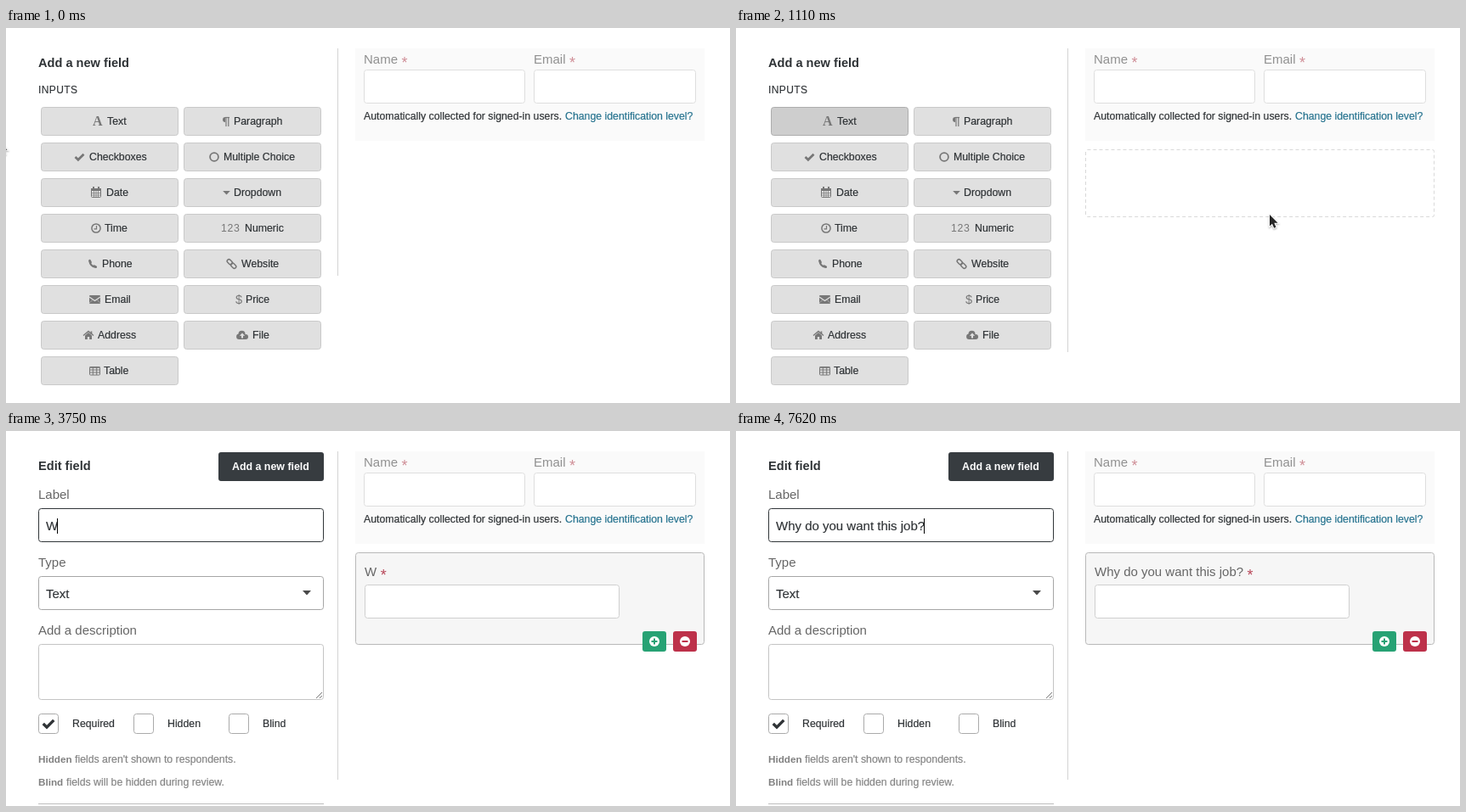
Recreate the animation shown at these times as an HTML page with a canvas. Size 852 by 442 pixels, loop 7680 ms.

```html
<!DOCTYPE html>
<html lang="en">
<head>
<meta charset="utf-8">
<title>Form builder</title>
<style>
  html, body { margin: 0; width: 100%; height: 100%; overflow: hidden; background: #fff; }
  canvas { display: block; width: 852px; height: 442px; }
</style>
</head>
<body>
<canvas id="stage" width="852" height="442"></canvas>
<script>
const ctx = document.getElementById('stage').getContext('2d');
const LOOP = 7680;
const SANS = '"Liberation Sans", Arial, sans-serif';
const SMALL = `12.3px ${SANS}`;
const BODY = `15px ${SANS}`;
const HEAD = `bold 14.6px ${SANS}`;
const INK = '#2f3336', ICON = '#777', LABEL = '#666', REQUIRED = '#b8485a';

const DRAG_START = 390, DROP = 1260, TYPE_START = 3750;
const SELECT_START = 2940, SELECT_END = 3210;
const QUESTION = 'Why do you want this job?';
const KEY_TIMES = [
  3750, 3960, 4050, 4140, 4230, 4320, 4410, 4500, 4590, 4680, 4800,
  4950, 5010, 5070, 5250, 5700, 5850, 5970, 6180, 6330, 6660, 6780,
  6990, 7080, 7500
];

// Pointer path: time, x, y
const PATH = [
  [0, -8, 134], [300, 146, 112], [390, 140, 112], [510, 110, 143],
  [960, 628, 220], [2460, 628, 220], [2880, 101, 111],
  [SELECT_START, 101, 111], [SELECT_END, 43, 111]
];

function text(str, x, y, font, color, weight = 0) {
  ctx.font = font;
  ctx.fillStyle = color;
  ctx.fillText(str, x, y);
  if (weight) {
    ctx.strokeStyle = color;
    ctx.lineWidth = weight;
    ctx.strokeText(str, x, y);
  }
  return ctx.measureText(str).width;
}

const small = (str, x, y, color = INK) => text(str, x, y, SMALL, color, 0.2);

function box(x, y, w, h, fill, border, radius = 3) {
  ctx.beginPath();
  if (border) ctx.roundRect(x + 0.5, y + 0.5, w - 1, h - 1, radius);
  else ctx.roundRect(x, y, w, h, radius);
  ctx.fillStyle = fill;
  ctx.fill();
  if (border) {
    ctx.strokeStyle = border;
    ctx.lineWidth = 1;
    ctx.stroke();
  }
}

function trace(points) {
  ctx.beginPath();
  points.forEach(([x, y], i) => i ? ctx.lineTo(x, y) : ctx.moveTo(x, y));
}

function poly(points, color) {
  trace(points);
  ctx.closePath();
  ctx.fillStyle = color;
  ctx.fill();
}

function line(points, color, width = 1) {
  trace(points);
  ctx.strokeStyle = color;
  ctx.lineWidth = width;
  ctx.stroke();
}

function disc(x, y, r, color) {
  ctx.beginPath();
  ctx.arc(x, y, r, 0, Math.PI * 2);
  ctx.fillStyle = color;
  ctx.fill();
}

function ring(x, y, r, color, width) {
  ctx.beginPath();
  ctx.arc(x, y, r, 0, Math.PI * 2);
  ctx.strokeStyle = color;
  ctx.lineWidth = width;
  ctx.stroke();
}

function asterisk(x, y, color) {
  text('*', x, y + 5, `18px ${SANS}`, color);
}

function tick(x, y, s, color) {
  line([[x - 5 * s, y], [x - 1.6 * s, y + 3.3 * s], [x + 5 * s, y - 3.3 * s]], color, 2.7 * s);
}

// Icons are drawn around their own centre.
const icons = {
  font() { text('A', -6, 5, 'bold 16px "Liberation Serif", serif', ICON); },
  paragraph() {
    ctx.beginPath();
    ctx.arc(-1, -2, 3, Math.PI / 2, Math.PI * 1.5);
    ctx.fillStyle = ICON;
    ctx.fill();
    line([[-1, -4.5], [4, -4.5]], ICON, 1.2);
    line([[0, -5], [0, 6]], ICON, 1.2);
    line([[2.8, -5], [2.8, 6]], ICON, 1.2);
  },
  check() { tick(0, 0, 1, ICON); },
  circle() { ring(0, 0, 4.9, ICON, 1.8); },
  calendar() {
    box(-6, -5, 12, 11, '#e0e0e0', ICON, 1);
    ctx.fillRect(0, 0, 0, 0);
    ctx.fillStyle = ICON;
    ctx.fillRect(-6, -5, 12, 3);
    ctx.fillRect(-4, -7, 2, 4);
    ctx.fillRect(2, -7, 2, 4);
    for (const x of [-2.5, 0, 2.5]) line([[x, -2], [x, 6]], ICON, 0.7);
    for (const y of [0.5, 3]) line([[-6, y], [6, y]], ICON, 0.7);
  },
  caret() { poly([[-4.3, -2], [4.3, -2], [0, 2.5]], ICON); },
  clock() {
    ring(0, 0, 5.1, ICON, 1.5);
    line([[0.5, -3], [0.5, 0.8], [-2.5, 0.8]], ICON, 1.2);
  },
  digits() {
    ctx.letterSpacing = '0.7px';
    text('123', -11, 4, SMALL, ICON);
    ctx.letterSpacing = '0px';
  },
  phone() {
    ctx.lineCap = 'round';
    ctx.beginPath();
    ctx.moveTo(-3.6, -3.2);
    ctx.quadraticCurveTo(-2.8, 2.6, 3.2, 3.7);
    ctx.strokeStyle = ICON;
    ctx.lineWidth = 2.2;
    ctx.stroke();
    line([[-3.5, -3.8], [-2.4, -1.8]], ICON, 2.6);
    line([[1.8, 2.6], [3.8, 3.6]], ICON, 2.6);
    ctx.lineCap = 'butt';
  },
  link() {
    ctx.save();
    ctx.rotate(Math.PI / 4);
    for (const x of [-6.6, -0.4]) {
      ctx.beginPath();
      ctx.roundRect(x, -2.1, 7, 4.2, 2.1);
      ctx.strokeStyle = ICON;
      ctx.lineWidth = 1.5;
      ctx.stroke();
    }
    ctx.restore();
  },
  envelope() {
    box(-6.5, -5, 13, 10, ICON, null, 1);
    line([[-6.5, -3], [0, 1.5], [6.5, -3]], '#e0e0e0', 1.1);
    line([[-6.5, 4], [-2.5, 0.5]], '#c4c4c4', 0.6);
    line([[6.5, 4], [2.5, 0.5]], '#c4c4c4', 0.6);
  },
  dollar() { text('$', -4, 5, `14.5px ${SANS}`, ICON); },
  home() {
    line([[-6, 0.5], [0, -4.5], [6, 0.5]], ICON, 1.4);
    poly([[-4, 0.4], [0, -3], [4, 0.4], [4, 5], [1.2, 5], [1.2, 2], [-1.2, 2], [-1.2, 5], [-4, 5]], ICON);
    ctx.fillRect(2.6, -4.5, 1.7, 3.5);
  },
  cloud() {
    disc(-3.6, 1.7, 3.3, ICON);
    disc(-0.5, -1.2, 4, ICON);
    disc(4, 2, 3, ICON);
    ctx.fillRect(-3.6, 0, 7.6, 5);
    poly([[-3.2, 0.8], [0, -2.6], [3.2, 0.8], [1, 0.8], [1, 3.6], [-1, 3.6], [-1, 0.8]], '#e0e0e0');
  },
  table() {
    box(-6.5, -5, 13, 10.5, '#e0e0e0', ICON, 1);
    line([[-6, -4], [6, -4]], ICON, 1.6);
    for (const x of [-2.2, 2.2]) line([[x, -4], [x, 5]], ICON);
    for (const y of [-1, 2]) line([[-6, y], [6, y]], ICON);
  }
};

// Label, text x, icon, icon centre x; filled row by row in two columns.
const INPUTS = [
  ['Text', 119, 'font', 108], ['Paragraph', 268, 'paragraph', 259],
  ['Checkboxes', 98, 'check', 86.5], ['Multiple Choice', 256, 'circle', 245],
  ['Date', 118, 'calendar', 106], ['Dropdown', 268, 'caret', 259.5],
  ['Time', 116, 'clock', 106], ['Numeric', 281, 'digits', 264],
  ['Phone', 113, 'phone', 102], ['Website', 277, 'link', 265.5],
  ['Email', 116, 'envelope', 104.5], ['Price', 282, 'dollar', 274],
  ['Address', 108, 'home', 97], ['File', 290, 'cloud', 278],
  ['Table', 115, 'table', 104.5]
];

function drawPalette(pressed) {
  text('Add a new field', 38, 46, HEAD, INK);
  ctx.letterSpacing = '0.4px';
  text('INPUTS', 38, 77, `12px ${SANS}`, INK, 0.15);
  ctx.letterSpacing = '0px';
  INPUTS.forEach(([label, x, icon, iconX], i) => {
    const y = 93 + 42 * (i >> 1);
    const active = pressed && i === 0;
    box(i % 2 ? 209 : 41, y, 162, 34, active ? '#cecece' : '#e0e0e0', active ? '#adadad' : '#c9c9c9');
    ctx.save();
    ctx.translate(iconX, y + 17);
    icons[icon]();
    ctx.restore();
    small(label, x, y + 21);
  });
}

function drawEditor(value, state) {
  text('Edit field', 38, 46, HEAD, INK);
  box(250, 25, 124, 34, '#373c40');
  text('Add a new field', 266, 46, `bold 12.4px ${SANS}`, '#fff');

  text('Label', 38, 80, BODY, LABEL);
  box(38, 91, 336, 40, '#fff', '#303538');
  if (state.selected > 0) {
    ctx.fillStyle = '#b4d5fe';
    ctx.fillRect(99 - state.selected, 102, state.selected, 19);
  }
  const width = text(value, 47, 117, BODY, INK, 0.15);
  if (state.caret) {
    ctx.fillStyle = '#000';
    ctx.fillRect(Math.round(46.3 + width), 103, 1, 18);
  }

  text('Type', 38, 160, BODY, LABEL);
  box(38, 171, 336, 40, '#fff', '#a6a6a6');
  text('Text', 47, 197, BODY, INK, 0.15);
  poly([[349, 188], [359, 188], [354, 193.5]], '#4a4a4a');

  text('Add a description', 38, 240, BODY, LABEL);
  box(38, 251, 336, 66, '#fff', '#c4c4c4');
  line([[365, 315], [372, 308]], '#777');
  line([[369, 315], [372, 312]], '#777');

  ['Required', 'Hidden', 'Blind'].forEach((label, i) => {
    const x = 38 + 112 * i;
    box(x, 333, 24, 24, '#fff', '#aaa');
    small(label, x + 40, 349);
  });
  tick(50, 345, 1.25, INK);

  const hints = [
    ['Hidden', 81, "fields aren't shown to respondents."],
    ['Blind', 71, 'fields will be hidden during review.']
  ];
  hints.forEach(([name, x, rest], i) => {
    const y = 391 + 27 * i;
    text(name, 38, y, `bold 11.7px ${SANS}`, '#808080');
    small(rest, x, y, '#858585');
  });
  ctx.fillStyle = '#bdbdbd';
  ctx.fillRect(38, 439, 336, 1);
}

function drawIdentity() {
  ctx.fillStyle = '#fafafa';
  ctx.fillRect(411, 24, 411, 109);
  [['Name', 421, 190], ['Email', 621, 191]].forEach(([label, x, w]) => {
    const end = x + text(label, x, 42, BODY, '#909090');
    asterisk(end + 4.5, 42, '#cf8f97');
    box(x, 49, w, 40, '#fff', '#dedede');
  });
  small('Automatically collected for signed-in users.', 421, 108);
  small('Change identification level?', 658, 108, '#26738f');
}

function badge(x, color, plus) {
  box(x, 236, 28, 24, color);
  disc(x + 14, 248, 6, '#fff');
  line([[x + 10.5, 248], [x + 17.5, 248]], color, 2);
  if (plus) line([[x + 14, 244.5], [x + 14, 251.5]], color, 2);
}

function drawField(label) {
  box(411, 143, 411, 109, '#f6f6f6', '#b9b9b9');
  const end = 422 + text(label, 422, 171, BODY, LABEL);
  asterisk(end + 4.5, 171, REQUIRED);
  box(422, 181, 300, 40, '#fff', '#cfcfcf');
  badge(749, '#27a274', true);
  badge(785, '#bd314a', false);
}

function drawPlaceholder() {
  ctx.setLineDash([4, 3]);
  box(411, 143, 411, 80, '#fff', '#d9d9d9', 2);
  ctx.setLineDash([]);
}

function pointerAt(t) {
  const next = PATH.findIndex(p => p[0] > t);
  if (next < 0) return PATH[PATH.length - 1].slice(1);
  const [t0, x0, y0] = PATH[next - 1], [t1, x1, y1] = PATH[next];
  const u = (t - t0) / (t1 - t0);
  const e = u * u * (3 - 2 * u);
  return [x0 + (x1 - x0) * e, y0 + (y1 - y0) * e];
}

function drawPointer(x, y, beam) {
  ctx.save();
  ctx.translate(Math.round(x), Math.round(y));
  if (beam) {
    line([[-2.5, -7.5], [0.5, -6.5], [0.5, 7.5], [-2.5, 8.5]], '#222');
    line([[3.5, -7.5], [0.5, -6.5], [0.5, 7.5], [3.5, 8.5]], '#222');
  } else {
    const arrow = [[0, 0], [0, 13.5], [3, 10.7], [5.2, 15.8], [7.5, 14.8], [5.3, 9.8], [9.6, 9.8]];
    ctx.shadowColor = 'rgba(0,0,0,.35)';
    ctx.shadowBlur = 2;
    ctx.shadowOffsetY = 1;
    line([...arrow, arrow[0]], '#fff', 2);
    ctx.shadowColor = 'transparent';
    poly(arrow, '#262626');
  }
  ctx.restore();
}

function draw(t) {
  ctx.fillStyle = '#fff';
  ctx.fillRect(0, 0, 852, 442);

  const [x, y] = pointerAt(t);
  const typing = t >= TYPE_START;
  const dropped = t >= DROP;
  const hovering = !dropped && t > DRAG_START && x > 411;
  const value = typing ? QUESTION.slice(0, KEY_TIMES.filter(k => k <= t).length) : 'Untitled';
  const selected = typing || t < SELECT_START ? 0 : Math.min(52, Math.max(0, 99 - x));

  ctx.fillStyle = '#d3d3d3';
  ctx.fillRect(390, 24, 1, dropped ? 387 : hovering ? 358 : 268);
  drawIdentity();
  if (dropped) {
    drawEditor(value, { selected, caret: typing });
    drawField(value);
  } else {
    drawPalette(t >= DRAG_START);
    if (hovering) drawPlaceholder();
  }
  if (!typing) drawPointer(x, y, dropped && x < 374 && y < 131);
}

const start = performance.now();
function tickFrame() {
  draw((performance.now() - start) % LOOP);
  requestAnimationFrame(tickFrame);
}
tickFrame();
</script>
</body>
</html>
```
